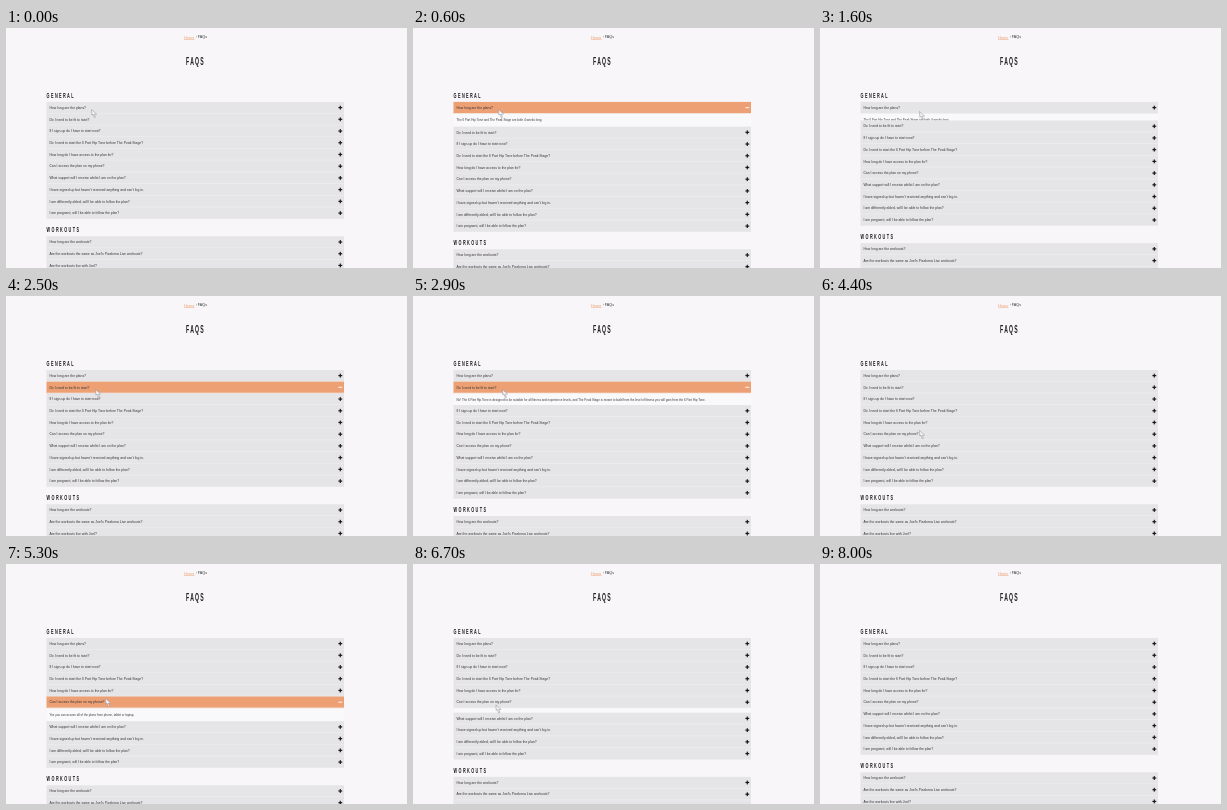
An HTML page with a canvas for the animation above (8200 ms loop, 401 by 240 pixels).

```html
<!DOCTYPE html>
<html lang="en">
<head>
<meta charset="utf-8">
<title>FAQs</title>
<style>
html, body { margin: 0; width: 100%; height: 100%; overflow: hidden; background: #f8f6f9; }
canvas { display: block; width: 401px; height: 240px; }
</style>
</head>
<body>
<canvas id="stage" width="401" height="240"></canvas>
<script>
const ctx = document.getElementById('stage').getContext('2d');
const LOOP = 8200, STEP = 100, SLIDE = 500;
const LEFT = 40.5, RIGHT = 338, PITCH = 11.72, DROP = 13;
const SANS = '"Liberation Sans", Arial, sans-serif';
const ORANGE = '#eca074';

const general = [
  'How long are the plans?',
  'Do I need to be fit to start?',
  'If I sign-up do I have to start now?',
  'Do I need to start the 6 Part Hip Tone before The Peak Stage?',
  'How long do I have access to the plan for?',
  'Can I access the plan on my phone?',
  'What support will I receive whilst I am on the plan?',
  "I have signed up but haven't received anything and can't log in.",
  'I am differently abled, will I be able to follow the plan?',
  'I am pregnant, will I be able to follow the plan?'
];
const workouts = [
  'How long are the workouts?',
  "Are the workouts the same as Joel's Pixalorna Live workouts?",
  'Are the workouts live with Joel?'
];

// Row, click to open, click to close, answer
const panels = [
  { row: 0, open: 100, close: 1360, text: 'The 6 Part Hip Tone and The Peak Stage are both 4 weeks long.' },
  { row: 1, open: 2500, close: 3600, text: 'No! The 6 Part Hip Tone is designed to be suitable for all fitness and experience levels, and The Peak Stage is meant to build from the level of fitness you will gain from the 6 Part Hip Tone.' },
  { row: 5, open: 4700, close: 6400, text: 'Yes you can access all of the plans from phone, tablet or laptop.' }
];

// Pointer path: time, x, y
const path = [
  [0, 85, 81], [1000, 85, 81], [1300, 99, 83], [1850, 99, 83],
  [2200, 89, 93], [3750, 89, 93], [4400, 99, 134],
  [6500, 99, 134], [7200, 11, 168]
];

const clamp = v => Math.max(0, Math.min(1, v));
const swing = v => 0.5 - Math.cos(Math.PI * clamp(v)) / 2;

function label(text, x, y, size, color, weight = 400) {
  ctx.font = `${weight} ${size}px ${SANS}`;
  ctx.fillStyle = color;
  ctx.fillText(text, x, y);
}

// Narrow, widely tracked capitals
function heading(text, x, y, size, tracking) {
  ctx.save();
  ctx.translate(x, y);
  ctx.scale(0.5, 1);
  ctx.letterSpacing = tracking * 2 + 'px';
  label(text, 0, 0, size, '#1d1b1e', 700);
  ctx.restore();
}

function row(text, y, active) {
  ctx.fillStyle = active ? ORANGE : '#e5e4e6';
  ctx.fillRect(LEFT, y, RIGHT - LEFT, PITCH);
  ctx.fillStyle = '#efeef0';
  ctx.fillRect(LEFT, y + PITCH - 0.6, RIGHT - LEFT, 0.6);
  label(text, 43.4, y + 6.9, 3.4, '#333135');
  const mid = y + 5.7;
  ctx.fillStyle = active ? '#fbeadf' : '#19181a';
  ctx.fillRect(332.4, mid - 0.6, 3.8, 1.2);
  if (!active) ctx.fillRect(333.7, mid - 1.9, 1.2, 3.8);
}

function answer(text, y, height) {
  ctx.save();
  ctx.beginPath();
  ctx.rect(LEFT, y, RIGHT - LEFT, height);
  ctx.clip();
  ctx.fillStyle = '#f9f8fa';
  ctx.fillRect(LEFT, y, RIGHT - LEFT, height);
  label(text, 43.4, y + 7.6, 3, '#3c3a3e');
  ctx.restore();
}

function pointer(t) {
  const i = path.findIndex(p => p[0] > t);
  if (i < 0) return;
  const [t0, x0, y0] = path[i - 1], [t1, x1, y1] = path[i];
  const k = swing((t - t0) / (t1 - t0));
  ctx.save();
  ctx.translate(x0 + (x1 - x0) * k, y0 + (y1 - y0) * k);
  ctx.lineWidth = 0.5;
  ctx.strokeStyle = '#8f8d92';
  ctx.fillStyle = '#f4f3f5';
  ctx.beginPath();
  ctx.moveTo(0.5, 0.5);
  ctx.lineTo(0.8, 6);
  ctx.lineTo(2, 5);
  ctx.lineTo(3.2, 8.6);
  ctx.lineTo(4.4, 8.2);
  ctx.lineTo(3.4, 5.2);
  ctx.lineTo(5.6, 5);
  ctx.closePath();
  ctx.fill();
  ctx.stroke();
  ctx.restore();
}

function draw(t) {
  ctx.fillStyle = '#f8f6f9';
  ctx.fillRect(0, 0, 401, 240);

  label('Home', 178, 10.6, 3.9, ORANGE);
  ctx.fillStyle = ORANGE;
  ctx.fillRect(178, 11.1, 10.5, 0.5);
  label('›', 189.8, 10.4, 3.6, '#555');
  label('FAQs', 191.8, 10.4, 3.7, '#333');
  heading('FAQS', 180, 37.4, 10.2, 1.3);
  heading('GENERAL', 40.6, 69.9, 7.6, 1.4);

  let y = 73.9;
  general.forEach((text, i) => {
    const p = panels.find(q => q.row === i);
    row(text, y, p && t >= p.open && t < p.close);
    y += PITCH;
    if (!p) return;
    const height = DROP * (swing((t - p.open) / SLIDE) - swing((t - p.close) / SLIDE));
    if (height > 0.01) {
      answer(p.text, y, height);
      y += height;
    }
  });

  heading('WORKOUTS', 40.6, y + 13, 7.6, 1.4);
  workouts.forEach((text, i) => row(text, y + 17.2 + i * PITCH, false));
  pointer(t);
}

const start = performance.now();
function frame() {
  const t = (performance.now() - start) % LOOP;
  draw(Math.floor(t / STEP) * STEP);
  requestAnimationFrame(frame);
}
frame();
</script>
</body>
</html>
```
